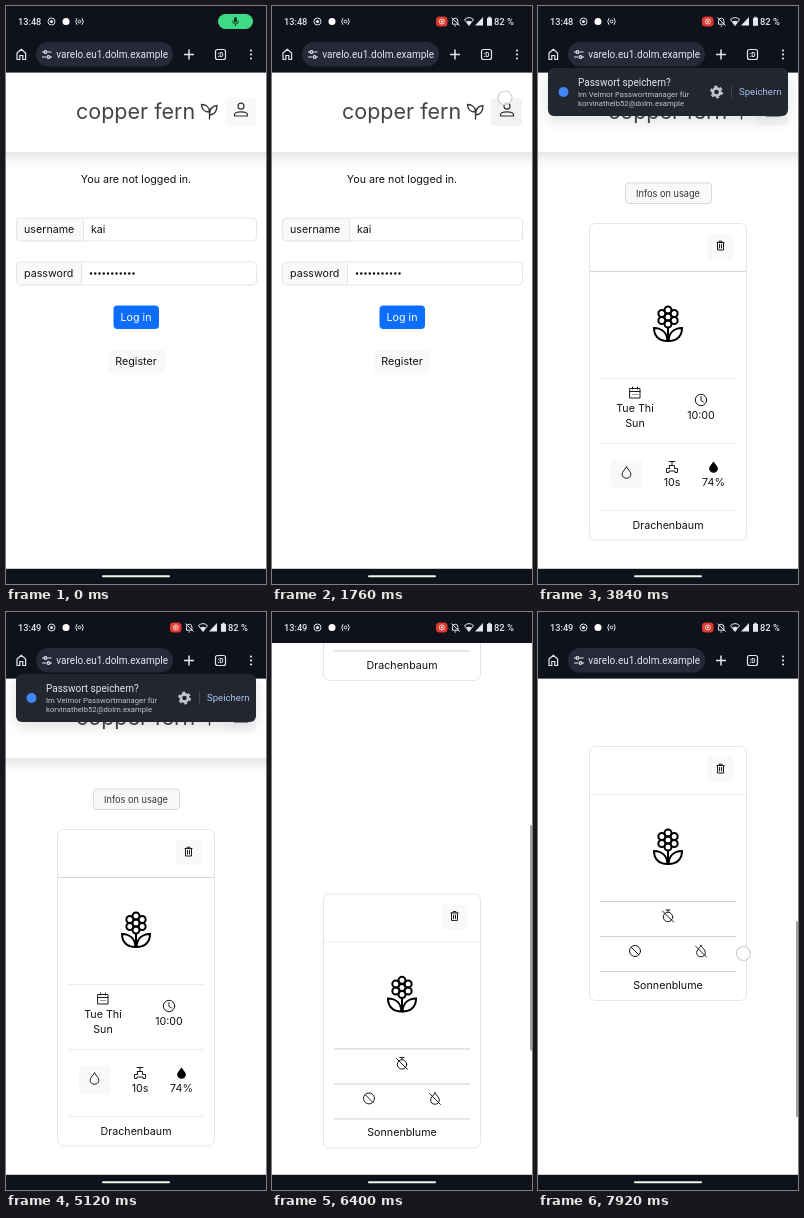
These frames come from a looping animation (260 px wide and 578 px high, 8 s). An HTML page:

```html
<!DOCTYPE html>
<html lang="en">
<head>
<meta charset="utf-8">
<title>Plant watering app</title>
<style>
  html, body { margin: 0; width: 100%; height: 100%; overflow: hidden; background: #fff; }
  svg { display: block; width: 100vw; height: 100vh; }
  text { font: 10.7px Inter, sans-serif; fill: #111; }
  .mid { text-anchor: middle; }
  .ui text, text.ui { font-family: Roboto, sans-serif; fill: #e6e7ee; }
  .line { fill: none; stroke: #1a1a1a; stroke-width: 1; stroke-linecap: round; stroke-linejoin: round; }
  .light { fill: none; stroke: #e6e7ee; stroke-width: 1.2; }
  .soft { fill: #f8f9fa; }
  .box { fill: none; stroke: #e3e5e8; }
  /* Variables also reach the shared parts inside <use>. */
  #page { --hr: #eee; --head: #d4d4d4; }
  #page.moved { --hr: #cfcfcf; --head: #eee; }
  .hr { stroke: var(--hr); }
  .head { stroke: var(--head); }
</style>
</head>
<body>
<svg viewBox="0 0 260 578" preserveAspectRatio="none">
  <defs>
    <filter id="shade" x="-20%" y="-20%" width="140%" height="160%">
      <feDropShadow dx="0" dy="5" stdDeviation="6.5" flood-opacity=".12"/>
    </filter>
    <clipPath id="urlClip"><rect x="50" y="36" width="113" height="24"/></clipPath>
    <path id="drop" d="M0-5.5C2-2.5 4.4-.5 4.4 1.6A4.4 4.2 0 0 1-4.4 1.6C-4.4-.5-2-2.5 0-5.5Z"/>
    <path id="leaf" d="M-14 4C-6 4-1 9-.5 17C-9 17-14 12-14 4Z"/>
    <g id="flower" fill="none" stroke="#000" stroke-width="2">
      <g id="petals"></g>
      <path d="M0 4V17"/>
      <use href="#leaf"/><use href="#leaf" transform="scale(-1 1)"/>
    </g>
    <g id="cardTop">
      <rect class="soft" x="169.500" y="10" width="26" height="25" rx="3"/>
      <path class="line" d="M179 18.500h7M181 18v-.8h3v.8M179.500 18.500v7.500h6v-7.500M181.500 20.500v3.500M183.500 20.500v3.500"/>
      <path class="head" d="M52 47.500H208"/>
      <use href="#flower" x="130" y="100"/>
      <path class="hr" d="M62 154.500H198"/>
    </g>
  </defs>

  <rect width="260" height="578" fill="#fff"/>

  <g id="page">
    <rect x="-20" y="40" width="300" height="106" fill="#fff" filter="url(#shade)"/>
    <text x="70" y="113" style="font-size:21.500px;fill:#444">copper fern</text>
    <path class="line" style="stroke:#333;stroke-width:1.300" d="M203.500 113V106M203.500 106C203.500 101 200 98.500 195.500 98.500C195.500 103 198.500 106 203.500 106ZM203.500 109C203.500 103 206 100 211 99.500C211 105 208.500 108.500 203.500 109Z"/>
    <rect id="profile" class="soft" x="219" y="92" width="31" height="28" rx="3"/>
    <g class="line" style="stroke:#333;stroke-width:1.200">
      <circle cx="235" cy="100.200" r="3"/>
      <path d="M228.500 110v-1.200C228.500 104.800 241.500 104.800 241.500 108.800v1.200Z"/>
    </g>

    <g id="login">
      <text class="mid" x="130" y="177.500">You are not logged in.</text>
      <rect class="soft" x="10.500" y="212.500" width="67" height="23" rx="4"/>
      <rect class="box" x="10.500" y="212.500" width="240" height="23" rx="4"/>
      <path class="box" d="M77.500 212.500v23"/>
      <text x="18" y="227.500">username</text>
      <text x="85" y="227.500">kai</text>
      <rect class="soft" x="10.500" y="256.500" width="65" height="23" rx="4"/>
      <rect class="box" x="10.500" y="256.500" width="240" height="23" rx="4"/>
      <path class="box" d="M75.500 256.500v23"/>
      <text x="18" y="271.500">password</text>
      <path d="M85 268H129" stroke="#111" stroke-width="2.500" stroke-linecap="round" stroke-dasharray="0 4.250"/>
      <rect id="submit" x="107.500" y="300" width="45.500" height="23.500" rx="4"/>
      <text class="mid" x="130" y="315.500" style="fill:#fff">Log in</text>
      <rect class="soft" x="102" y="344" width="57" height="23.500" rx="4"/>
      <text class="mid" x="130" y="359.500">Register</text>
    </g>

    <g id="home">
      <rect x="87.500" y="177" width="86" height="20.500" rx="3.500" fill="#f9f9fa" stroke="#d9d9db"/>
      <text class="mid" x="130" y="190.500" style="font-size:9.200px;fill:#333">Infos on usage</text>

      <g transform="translate(0 218)">
        <rect class="box" x="51.500" y="-.5" width="157" height="316.500" rx="6"/>
        <use href="#cardTop"/>
        <path class="line" d="M92 164.500h10v9.500h-10zM92 167.500h10M94.500 163v2M99.500 163v2M95 170.500h.1M97 170.500h.1M99 170.500h.1"/>
        <text class="mid" x="97" y="188">Tue Thi</text>
        <text class="mid" x="97" y="203">Sun</text>
        <g class="line"><circle cx="163" cy="176" r="5.700"/><path d="M163 172.500v4l2.500 1.500"/></g>
        <text class="mid" x="163" y="195">10:00</text>
        <path class="hr" d="M62 219.500H198M62 286.500H198"/>
        <rect class="soft" x="73" y="236" width="31.500" height="28" rx="3"/>
        <use href="#drop" class="line" x="88.500" y="248.500"/>
        <path class="line" d="M131 237.500h6M134 237.500v4M131.500 241.500h5v3h3v4h-2.500v-1.500h-6v1.500h-2.500v-4h3z"/>
        <text class="mid" x="134" y="261.500">10s</text>
        <use href="#drop" x="175.500" y="243"/>
        <text class="mid" x="175.500" y="261.500">74%</text>
        <text class="mid" x="130" y="305">Drachenbaum</text>
      </g>

      <g transform="translate(0 748)">
        <rect class="box" x="51.500" y="-.5" width="157" height="254" rx="6"/>
        <use href="#cardTop"/>
        <g class="line">
          <circle cx="130" cy="170" r="4.700"/>
          <path d="M128 163h4M130 163v2M124.500 164l11 11"/>
          <circle cx="97" cy="204" r="5.500"/><path d="M93.200 200.200l7.600 7.600"/>
          <use href="#drop" x="163" y="204"/><path d="M157.500 199l11 11"/>
        </g>
        <path class="hr" d="M62 189.500H198M62 224.500H198"/>
        <text class="mid" x="130" y="242">Sonnenblume</text>
      </g>
    </g>
  </g>

  <rect id="thumb" x="258" width="2" fill="#a0a0a0"/>

  <g id="bar" class="ui">
    <rect y="31" width="260" height="35.600" fill="#0f121b"/>
    <rect x="30" y="36" width="137" height="24.500" rx="12.200" fill="#252938"/>
    <path class="light" d="M11 47l4.300-3.600 4.300 3.600v6.500h-2.800v-4h-3v4h-2.800z"/>
    <path class="light" d="M36 46h2M41.500 46h4M36 51h4M44 51h2"/>
    <g class="light"><circle cx="39.500" cy="46" r="1.400"/><circle cx="42.500" cy="51" r="1.400"/></g>
    <g clip-path="url(#urlClip)"><text x="162" y="52" text-anchor="end" style="font-size:10px">kavarelo.eu1.dolm.example</text></g>
    <path class="light" style="stroke-width:1.500" d="M178 48.500h10M183 43.500v10"/>
    <rect class="light" x="209.500" y="43.500" width="10" height="10" rx="2"/>
    <text class="mid" x="214.500" y="51" style="font-size:6.500px;font-weight:700">:D</text>
    <path d="M245 44.500v8.200" stroke="#e6e7ee" stroke-width="2.200" stroke-linecap="round" stroke-dasharray="0 4"/>
  </g>

  <g id="popup" class="ui">
    <rect x="10" y="62" width="240" height="48" rx="6" fill="#23252f" filter="url(#shade)"/>
    <circle cx="25.500" cy="86" r="5" fill="#4285f4"/>
    <text x="40" y="79.500" style="font-size:10px">Passwort speichern?</text>
    <g style="opacity:.82">
      <text x="40" y="91" style="font-size:7.700px">Im Velmor Passwortmanager für</text>
      <text x="40" y="100" style="font-size:7.700px">korvinathelb52@dolm.example</text>
    </g>
    <g fill="none" stroke="#c3c6d2">
      <circle cx="178.500" cy="86" r="3.600" stroke-width="2.600"/>
      <circle cx="178.500" cy="86" r="5.500" stroke-width="1.800" stroke-dasharray="2.880"/>
    </g>
    <path d="M193.500 79v14" stroke="#3d4252"/>
    <text x="201" y="89.300" style="font-size:9.600px;fill:#a9c3f7">Speichern</text>
  </g>

  <g class="ui">
    <rect width="260" height="31" fill="#0f121b"/>
    <text id="clock" x="12" y="18.700" style="font-size:9.200px;font-weight:500"></text>
    <circle class="light" style="stroke-width:1" cx="45.500" cy="15.500" r="3.500"/><circle cx="45.500" cy="15.500" r="1.600" fill="#e6e7ee"/>
    <circle cx="60" cy="15.500" r="3.500" fill="#fff"/>
    <path class="light" style="stroke-width:1" d="M71 12.200q-2.500 3.300 0 6.600M76 12.200q2.500 3.300 0 6.600"/>
    <circle class="light" style="stroke-width:1" cx="73.500" cy="15.500" r="1.400"/>
    <g id="chip">
      <rect x="212" y="8" width="35" height="15" rx="7.500" fill="#3ddc84"/>
      <rect x="228" y="11" width="3" height="5.500" rx="1.500" fill="#12331f"/>
      <path d="M226.500 14.500q0 3.500 3 3.500t3-3.500M229.500 18v2" fill="none" stroke="#12331f" stroke-width=".9"/>
    </g>
    <g id="icons">
      <rect x="164" y="10.500" width="11.500" height="10" rx="3.500" fill="#e0392f"/>
      <circle cx="169.800" cy="15.500" r="2.500" fill="none" stroke="#fff" stroke-width=".8"/><circle cx="169.800" cy="15.500" r="1" fill="#fff"/>
      <path class="light" style="stroke-width:1" d="M180.500 18.200v-3q0-3 2.700-3t2.700 3v3zM182.500 20h1.500M179.500 11.500l8 8"/>
      <path d="M192.500 13.500q4.500-3.800 9 0L197 19.500Z" class="light" style="stroke-width:1"/><path d="M194.500 15.500q2.500-1.500 5 0L197 19.500ZM203 19.500h8v-8.500z" fill="#e6e7ee"/>
      <path d="M215 12h1.300v-1.200h2.400V12h1.300v7.700h-5z" fill="#e6e7ee"/>
      <text x="222" y="18.700" style="font-size:9.400px;font-weight:500">82 %</text>
    </g>
  </g>

  <rect y="562.800" width="260" height="15.200" fill="#0f121b"/>
  <rect x="96" y="569.200" width="68" height="2" rx="1" fill="#f2f2ea"/>

  <circle id="touch" r="7" fill="#fff" fill-opacity=".75" stroke="#cdcdd6" stroke-width="1.200"/>
</svg>
<script>
const LOOP = 8000, BAR = 36, CONTENT = 1252, FAR = 723;
const $ = id => document.getElementById(id);
const set = (id, attrs) => { for (const k in attrs) $(id).setAttribute(k, attrs[k]); };
const show = (id, on) => set(id, { visibility: on ? 'visible' : 'hidden' });
const clamp = v => Math.min(1, Math.max(0, v));
const ramp = (t, a, b) => clamp((t - a) / (b - a));
const within = (t, a, b) => t >= a && t < b;

const petal = (x, y) => `<circle cx="${x}" cy="${y}" r="3.500"/>`;
$('petals').innerHTML = petal(0, -7) + [0, 1, 2, 3, 4, 5].map(i => {
  const a = Math.PI * (i / 3 + 1 / 6);
  return petal(7.1 * Math.cos(a), -7 + 7.1 * Math.sin(a));
}).join('');

// Upward travel of the page: drag, fling, then a slow drag back.
function travel(t) {
  if (t < 6000) return 21 * ramp(t, 5840, 6000) ** 2;
  if (t < 6240) return 21 + 215 * ramp(t, 6000, 6240) ** 1.5;
  if (t < 6880) return FAR - 487 * (1 - ramp(t, 6240, 6880)) ** 2.2;
  return FAR - 80 * ramp(t, 7080, 7520) - 30 * ramp(t, 7520, 7920);
}

function touchAt(t, moved) {
  if (within(t, 1680, 1860)) return [233, 92];
  if (within(t, 2760, 2900)) return [130, 312];
  if (within(t, 5800, 6240)) return [200, 366 - moved];
  if (t >= 7040) return [205.5 - 3 * (moved - 613) / 110, 341.5 - (moved - 613)];
}

function draw(t) {
  const moved = travel(t);
  const hidden = t < 6880 ? Math.min(BAR, moved) : Math.max(0, BAR - (FAR - moved));
  const view = 495 + hidden;
  const loggedIn = t >= 3840;

  set('page', { transform: `translate(0 ${-moved})`, class: moved > 0 ? 'moved' : '' });
  set('bar', { transform: `translate(0 ${-hidden})` });
  set('login', { transform: `translate(0 ${t < 1920 ? -0.5 : 0})` });
  show('login', !loggedIn);
  show('home', loggedIn);
  set('profile', { style: within(t, 1680, 1920) ? 'fill:#f2f2f3' : '' });
  set('submit', { fill: within(t, 2760, 2900) ? '#0b5ed7' : '#0d6efd' });

  set('thumb', {
    y: 67 - hidden + (moved - hidden) * view / CONTENT,
    height: view * view / CONTENT
  });
  show('thumb', moved > BAR);

  const leave = ramp(t, 5780, 5940);
  set('popup', { transform: `translate(0 ${-50 * leave})`, opacity: 1 - leave });
  show('popup', loggedIn && leave < 1);

  $('clock').textContent = t < 5120 ? '13:48' : '13:49';
  const shrink = ramp(t, 400, 760);
  set('chip', {
    transform: `translate(${240 * shrink} ${15 * shrink}) scale(${1 - shrink})`,
    opacity: 1 - shrink
  });
  set('icons', { opacity: ramp(t, 600, 860) });

  const finger = touchAt(t, moved);
  show('touch', finger);
  if (finger) set('touch', { cx: finger[0], cy: finger[1] });
}

const start = performance.now();
function tick() {
  draw((performance.now() - start) % LOOP);
  requestAnimationFrame(tick);
}
tick();
</script>
</body>
</html>
```
